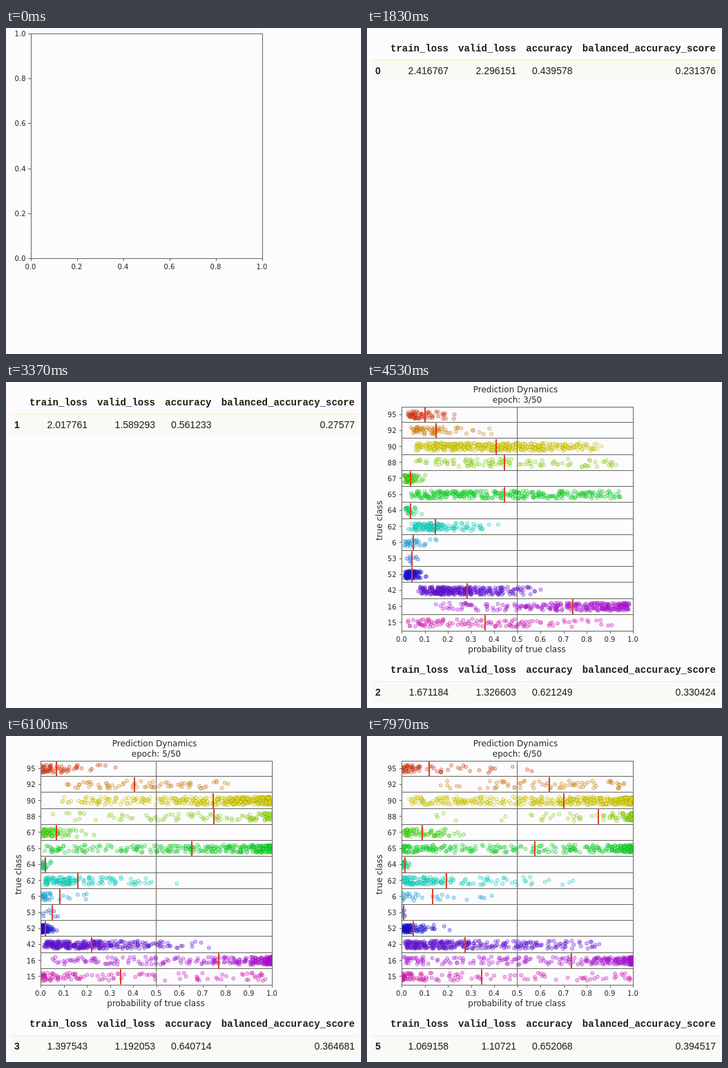
These frames come from a looping animation (514 by 473 pixels, 8 s). An HTML page with a canvas:

```html
<!DOCTYPE html>
<html lang="en">
<head>
<meta charset="utf-8">
<title>Prediction dynamics</title>
<style>
html, body { margin: 0; width: 100%; height: 100%; overflow: hidden; background: #fcfcff; }
canvas, svg { position: absolute; left: 0; top: 0; width: 514px; height: 473px; }
text { fill: #262620; font: 10px "DejaVu Sans", sans-serif; }
.big { font-size: 12px; }
.head { font: bold 14px "Liberation Mono", "Courier New", monospace; fill: #1c1c14; }
.cell { font: 14px "Liberation Sans", Arial, sans-serif; fill: #1c1c18; }
.index { font-weight: bold; }
.line { stroke: #66665a; stroke-width: 1; fill: none; shape-rendering: crispEdges; }
</style>
</head>
<body>
<canvas id="dots" width="514" height="473"></canvas>
<svg id="ink" viewBox="0 0 514 473"></svg>
<script>
const LOOP = 8000;
const BOX = { x: 50, y: 36, w: 335, h: 325 };

// label, number of dots, spread, mean probability at the key epochs
const KEY_EPOCHS = [0, 3, 5, 6];
const CLASSES = [
  [95, 65, 1.1, .10, .07, .12],
  [92, 70, 1, .15, .405, .64],
  [90, 430, 1.7, .41, .745, .70],
  [88, 110, 2.1, .445, .75, .85],
  [67, 75, .9, .04, .07, .09],
  [65, 300, 2.2, .445, .655, .575],
  [64, 26, .7, .04, .02, .015],
  [62, 140, 1.1, .145, .16, .195],
  [6, 30, 1.4, .05, .085, .135],
  [53, 8, .6, .045, .05, .01],
  [52, 110, .8, .045, .02, .05],
  [42, 310, 1.1, .285, .22, .275],
  [16, 270, 2.3, .74, .77, .735],
  [15, 115, 2.2, .36, .345, .345]
];
const ROW_H = BOX.h / CLASSES.length;

const COLUMNS = [["train_loss", 118], ["valid_loss", 216], ["accuracy", 297.5],
  ["balanced_accuracy_score", 505]];
const METRICS = [
  ["2.416767", "2.296151", "0.439578", "0.231376"],
  ["2.017761", "1.589293", "0.561233", "0.27577"],
  ["1.671184", "1.326603", "0.621249", "0.330424"],
  ["1.397543", "1.192053", "0.640714", "0.364681"],
  ["1.198916", "1.146418", "0.628548", "0.357642"],
  ["1.069158", "1.10721", "0.652068", "0.394517"]
];

const STARTS = [70, 1830, 3200, 4770, 6100, 7700];
const CLEARED = [2, 3, 6]; // epochs whose chart is wiped before the redraw
const WIPE = 200;
const ROW_LAG = 250;

const ink = document.getElementById("ink");
const ctx = document.getElementById("dots").getContext("2d");

const text = (x, y, s, anchor = "middle", cls = "", extra = "") =>
  `<text x="${x}" y="${y}" text-anchor="${anchor}" class="${cls}" ${extra}>${s}</text>`;
const path = d => `<path class="line" d="${d}"/>`;

function frame(x, y, w, h) {
  let out = path(`M${x + .5} ${y + .5}h${w}v${h}h${-w}z`);
  for (let i = 0; i <= 5; i++) {
    const tx = x + w * i / 5;
    out += path(`M${Math.round(tx) + .5} ${y + h}v4`);
    out += text(tx, y + h + 15.5, (i / 5).toFixed(1));
  }
  return out;
}

function emptyAxes() {
  let out = frame(35.5, 8, 335, 326);
  for (let i = 0; i <= 5; i++) {
    const y = 334 - 326 * i / 5;
    out += path(`M32 ${Math.round(y) + .5}h4`) + text(28.5, y + 4, (i / 5).toFixed(1), "end");
  }
  return out;
}

// Ten divisions under the chart, five under the empty axes.
function chart(epoch) {
  const { x, y, w, h } = BOX;
  let out = frame(x, y, w, h) + path(`M217.5 ${y}v${h}`);
  for (let i = 1; i < 10; i += 2) {
    const tx = x + w * i / 10;
    out += path(`M${Math.round(tx) + .5} ${y + h}v4`) + text(tx, y + h + 15.5, (i / 10).toFixed(1));
  }
  CLASSES.forEach(([label], i) => {
    const mid = y + ROW_H * (i + .5);
    if (i) out += path(`M${x} ${Math.round(y + ROW_H * i) - .5}h${w}`);
    out += path(`M${x - 3} ${Math.round(mid) - .5}h3`) + text(42.5, mid + 3.5, label, "end");
  });
  out += text(215, 14.5, "Prediction Dynamics", "middle", "big");
  out += text(217.5, 29.5, `epoch: ${epoch}/50`, "middle", "big");
  out += text(217, 392, "probability of true class", "middle", "big");
  out += text(0, 0, "true class", "middle", "big", 'transform="translate(21.5 201) rotate(-90)"');
  return out;
}

function table(row, top) {
  let out = `<rect x="6" y="${top + 47}" width="505" height="30" fill="#f9f9f5"/>` +
    `<rect x="6" y="${top + 46}" width="505" height="1" fill="#f0f0c8"/>`;
  out += text(12, top + 67, row, "start", "cell index");
  COLUMNS.forEach(([name, right], i) => {
    out += text(right, top + 34, name, "end", "head");
    out += text(right, top + 67, METRICS[row][i], "end", "cell");
  });
  return out;
}

function random(seed) {
  return () => {
    seed = (seed + 0x6D2B79F5) | 0;
    let v = Math.imul(seed ^ seed >>> 15, 1 | seed);
    v ^= v + Math.imul(v ^ v >>> 7, 61 | v);
    return ((v ^ v >>> 14) >>> 0) / 4294967296;
  };
}

function meanAt(epoch, keys) {
  const values = [0, ...keys];
  const k = KEY_EPOCHS.findIndex(e => e >= epoch);
  const from = KEY_EPOCHS[k - 1];
  const f = (epoch - from) / (KEY_EPOCHS[k] - from);
  return values[k - 1] + (values[k] - values[k - 1]) * f;
}

// Bell-shaped scores pushed through a logistic curve, keeping the given mean.
function sampler(mean, spread, rnd) {
  const centre = Math.log(mean / (1 - mean)) * Math.sqrt(1 + Math.PI / 8 * spread ** 2);
  return () => {
    const z = 2.45 * (rnd() + rnd() - 1);
    return 1 / (1 + Math.exp(-centre - spread * z));
  };
}

function drawDots(epoch) {
  const { x, y, w, h } = BOX;
  ctx.save();
  ctx.beginPath();
  ctx.rect(x, y, w + 1, h);
  ctx.clip();
  CLASSES.forEach(([, count, spread, ...keys], i) => {
    const rnd = random(epoch * 100 + i);
    const mean = meanAt(epoch, keys);
    const sample = sampler(mean, spread * epoch / 5, rnd);
    const mid = y + ROW_H * (i + .5);
    const hue = 12 + i * 23;
    ctx.lineWidth = 0.7;
    ctx.fillStyle = `hsl(${hue} 95% 52% / .3)`;
    ctx.strokeStyle = `hsl(${hue} 72% 34% / .5)`;
    for (let k = 0; k < count; k++) {
      ctx.beginPath();
      ctx.arc(x + w * sample(), mid + (rnd() - .5) * 11.5, 2.6, 0, 7);
      ctx.fill();
      ctx.stroke();
    }
    ctx.fillStyle = "#e43a24";
    ctx.fillRect(Math.round(x + w * mean) - 1, mid - ROW_H / 2 + .5, 2, ROW_H - 1);
  });
  ctx.restore();
}

function stateAt(t) {
  const epoch = STARTS.filter(s => s <= t).length;
  if (!epoch) return { axes: true, epoch: 0, row: -1 };
  const age = t - STARTS[epoch - 1];
  const wiped = CLEARED.includes(epoch) && age < WIPE;
  const row = Math.max(0, age < ROW_LAG ? epoch - 2 : epoch - 1);
  return { axes: false, epoch: wiped ? 0 : epoch, row };
}

function show({ axes, epoch, row }) {
  ctx.clearRect(0, 0, 514, 473);
  let out = axes ? emptyAxes() : "";
  if (epoch) {
    drawDots(epoch);
    out += chart(epoch);
  }
  if (row >= 0) out += table(row, epoch ? 388 : 0);
  ink.innerHTML = out;
}

const start = performance.now();
let shown;
function tick() {
  const state = stateAt((performance.now() - start) % LOOP);
  const key = Object.values(state).join();
  if (key !== shown) {
    shown = key;
    show(state);
  }
  requestAnimationFrame(tick);
}
tick();
</script>
</body>
</html>
```
